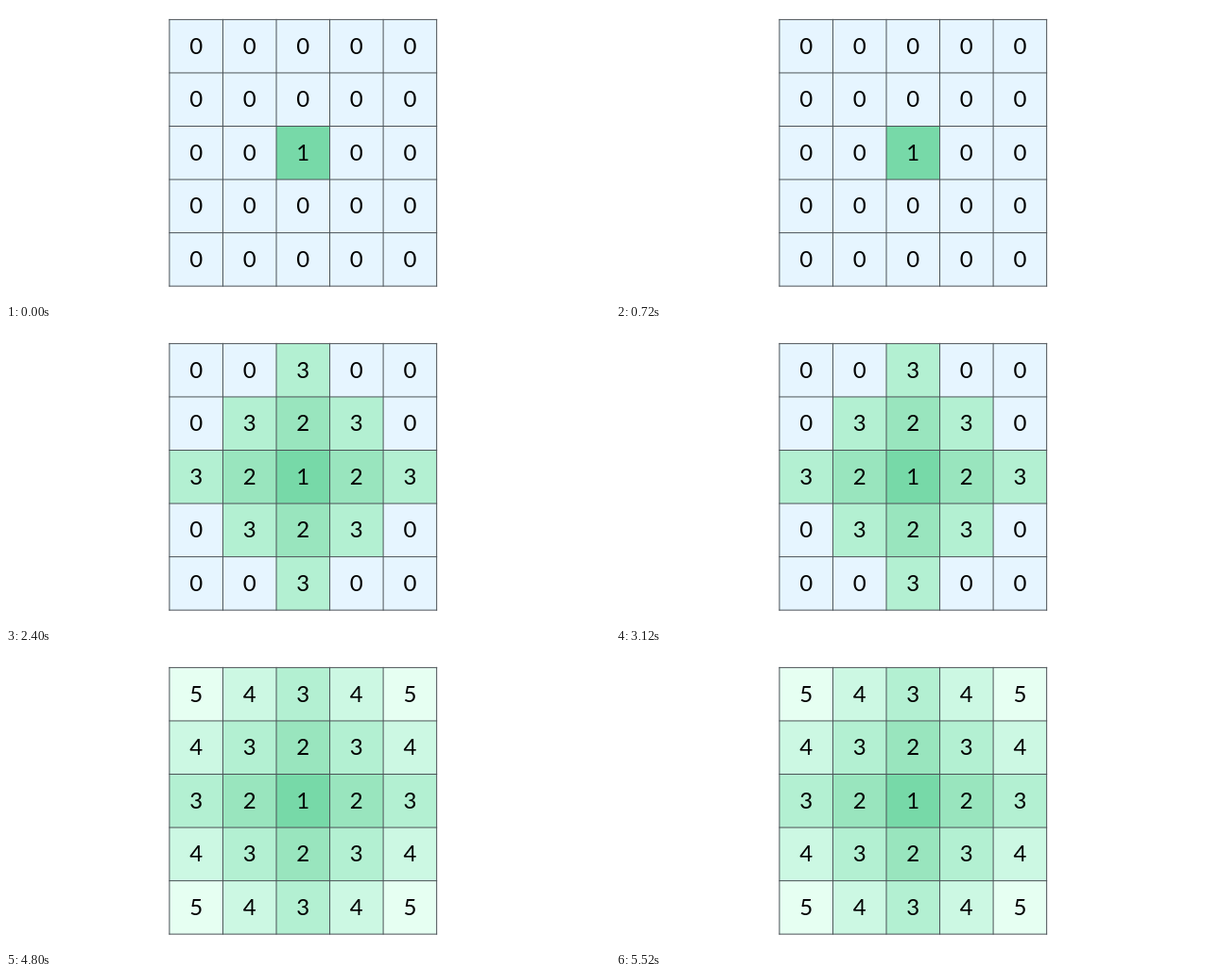
An HTML page with a canvas that plays this animation: 639x314 px, repeating every 6000 ms.

```html
<!DOCTYPE html>
<html lang="en">
<head>
<meta charset="utf-8">
<title>Flood fill</title>
<style>
  html, body { margin: 0; width: 100%; height: 100%; overflow: hidden; background: #fff; }
  canvas { display: block; }
</style>
</head>
<body>
<canvas id="stage" width="639" height="314"></canvas>
<script>
const ctx = document.getElementById('stage').getContext('2d');
const SIZE = 5, CELL = 56.55, LEFT = 172.9, TOP = 14.4, STEP = 1200;
const FILLS = ['#e6f5ff', '#77d9a8', '#99e5be', '#b3f0d2', '#ccf8e3', '#e6fff2'];

function drawCell(row, col, reach) {
  const distance = Math.abs(row - 2) + Math.abs(col - 2) + 1;
  const value = distance <= reach ? distance : 0;
  const x = LEFT + col * CELL, y = TOP + row * CELL;
  ctx.fillStyle = FILLS[value];
  ctx.fillRect(x, y, CELL, CELL);
  ctx.fillStyle = '#000';
  ctx.fillText(value, x + CELL / 2, y + 36.4);
}

function drawLines() {
  const end = SIZE * CELL;
  ctx.beginPath();
  for (let i = 0; i <= SIZE; i++) {
    const d = i * CELL;
    ctx.moveTo(LEFT + d, TOP - 0.5);
    ctx.lineTo(LEFT + d, TOP + end + 0.5);
    ctx.moveTo(LEFT - 0.5, TOP + d);
    ctx.lineTo(LEFT + end + 0.5, TOP + d);
  }
  ctx.strokeStyle = '#4b5257';
  ctx.lineWidth = 1;
  ctx.stroke();
}

function draw() {
  const reach = Math.floor(performance.now() % (SIZE * STEP) / STEP) + 1;
  ctx.fillStyle = '#fff';
  ctx.fillRect(0, 0, 639, 314);
  ctx.font = '24px Lato, sans-serif';
  ctx.textAlign = 'center';
  for (let row = 0; row < SIZE; row++)
    for (let col = 0; col < SIZE; col++) drawCell(row, col, reach);
  drawLines();
  requestAnimationFrame(draw);
}
draw();
</script>
</body>
</html>
```
